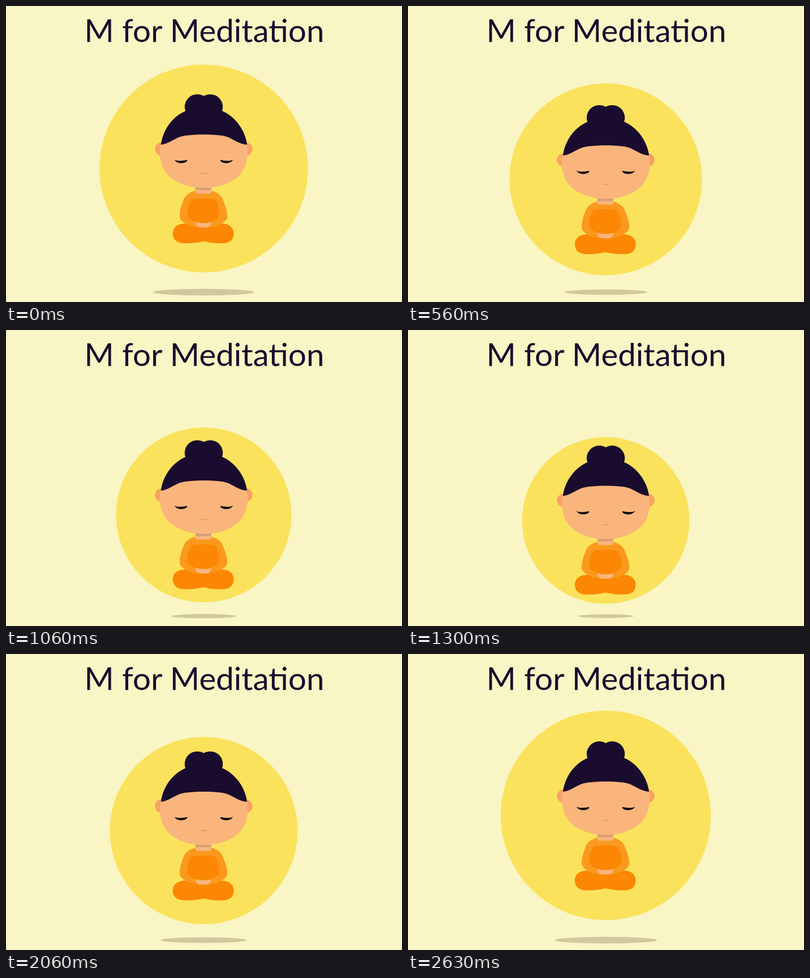
An HTML page for the animation above (2660 ms loop, 800 by 600 pixels).

```html
<!DOCTYPE html>
<html lang="en">
<head>
<meta charset="utf-8">
<title>M for Meditation</title>
<style>
  html, body { margin: 0; width: 100%; height: 100%; overflow: hidden; background: #f9f5c4; }
  svg { display: block; width: 800px; height: 600px; }
  text { font: 64.5px Lato, "Open Sans", sans-serif; fill: #1a0c2e; text-anchor: middle; }
  .hair { fill: #1a0c2e; }
  .skin { fill: #f9b57c; }
  .ear { fill: #f8a162; }
  .shade { fill: #d49d74; }
  .robe { fill: #fb991d; }
  .cloth { fill: #fb8704; }
</style>
</head>
<body>
<svg viewBox="0 0 800 600">
  <text x="400.5" y="73">M for Meditation</text>
  <circle id="sun" cx="399.5" fill="#fae25c"/>
  <ellipse id="shadow" cx="399.5" cy="580" fill="#d1c99e"/>
  <g id="monk">
    <path class="cloth" d="M399 449C385 444 375 441 362 441C345 441 337 450 337 461C337 474 346 481 362 481C378 481 385 480 399 477C413 480 420 481 436 481C452 481 460 474 460 461C460 450 452 441 436 441C423 441 413 444 399 449Z"/>
    <path class="robe" d="M383 374C372 377 363 383 360 390C354 404 350 418 351 428C352 438 372 447 385 448H413C426 447 446 438 447 428C448 418 443 404 437 390C434 383 425 377 414 374Z"/>
    <path class="skin" d="M382 436Q399 441 415 436Q414 449 405 449H392Q384 449 382 436Z"/>
    <path class="cloth" d="M374 393C380 389 417 389 423 393C428 400 432 415 431 422C429 434 415 440 399 440S368 434 366 422C366 415 369 400 374 393Z"/>
    <rect class="skin" x="382" y="362" width="33" height="18.5" rx="4"/>
    <rect class="shade" x="383" y="366" width="31" height="7"/>
    <circle class="ear" cx="314.5" cy="290" r="13.5"/>
    <circle class="ear" cx="484.5" cy="290" r="13.5"/>
    <path class="skin" d="M352 250L313 279C308 300 311 322 325 340C340 358 370 369 399.5 369C429 369 459 358 474 340C488 322 491 300 486 279L446 250Z"/>
    <circle class="hair" cx="386.5" cy="204.5" r="25.5"/>
    <circle class="hair" cx="412.5" cy="204.5" r="25.5"/>
    <path class="hair" d="M313 281C317 250 338 222 365 212H435C461 222 483 250 487 281C472 281 458 269 446 265C430 259 370 259 352 265C340 269 325 281 313 281Z"/>
    <path id="eye" fill="#120d12" d="M340 311.5C345 315 358 314 366 312C367 316 360 318.500 354 318.500C348 318.500 343 316 340 311.500Z"/>
    <use href="#eye" transform="translate(799) scale(-1 1)"/>
    <path class="shade" d="M390 338Q399.500 339.500 409 338Q399.500 343.500 390 338Z"/>
  </g>
</svg>
<script>
  const LOOP = 2660, TOP = 30, BOTTOM = 1430, REST = 2650;
  const [sun, shadow, monk] = ["sun", "shadow", "monk"].map(id => document.getElementById(id));
  const mix = (a, b, u) => a + (b - a) * u;
  const settle = u => u * (1.25 + u * (0.5 - 0.75 * u));

  // Height of the figure and radius of the disc at time t
  function pose(t) {
    if (t < TOP) return [mix(0, -2, t / TOP), mix(210.5, 212.6, t / TOP)];
    if (t < BOTTOM) {
      const u = (t - TOP) / (BOTTOM - TOP);
      return [mix(-2, 61, u), mix(212.6, 164.6, u)];
    }
    const u = Math.min(1, (t - BOTTOM) / (REST - BOTTOM));
    return [mix(61, -2, settle(u)), mix(164.6, 213, u)];
  }

  function draw() {
    const [drop, radius] = pose(performance.now() % LOOP);
    const spread = 102 - 0.826 * drop;
    monk.setAttribute("transform", `translate(0 ${drop})`);
    sun.setAttribute("r", radius);
    sun.setAttribute("cy", 329.5 + 1.361 * (210.5 - radius));
    shadow.setAttribute("rx", spread);
    shadow.setAttribute("ry", spread * 0.065);
    requestAnimationFrame(draw);
  }
  draw();
</script>
</body>
</html>
```
